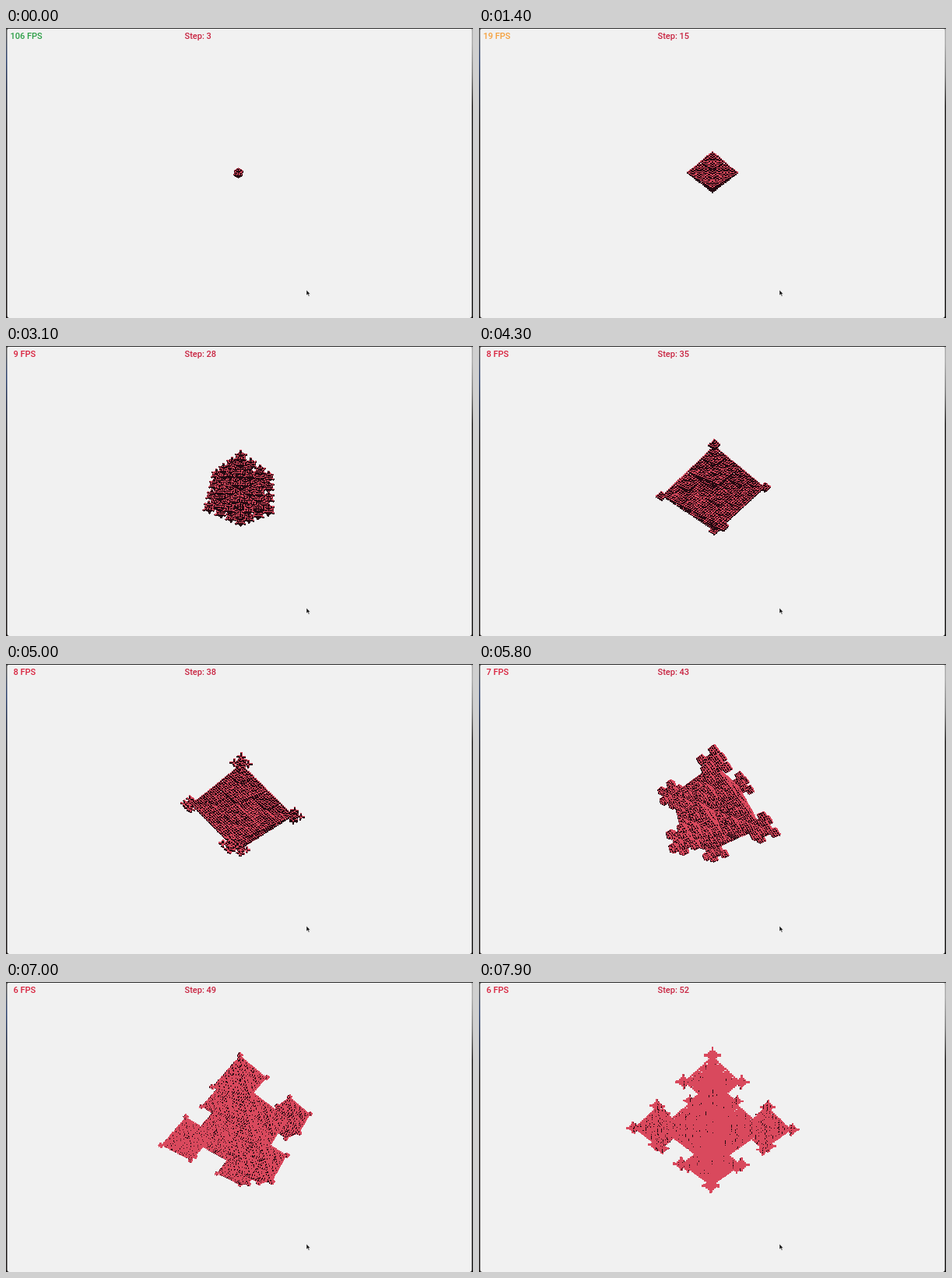
An HTML page with a canvas that plays this animation: 600x372 px, repeating every 8000 ms.

```html
<!DOCTYPE html>
<html lang="en">
<head>
<meta charset="utf-8">
<title>Growing crystal</title>
<style>
  html, body { margin: 0; width: 100%; height: 100%; overflow: hidden; background: #1c1917; }
  #stage { position: absolute; left: 0; top: 0; width: 600px; height: 372px; overflow: hidden;
    background: linear-gradient(#555 8px, #2f4470 40px, #1f2a45 75px, #1b1716 130px); }
  #edge { position: absolute; right: 0; top: 0; width: 3px; height: 372px;
    background: linear-gradient(#aaa 20px, #777 60px, #1d1b1a 100px, #151413); }
  canvas { position: absolute; left: 0; top: 0; clip-path: inset(1px 1.5px 0 1.5px round 2px 2px 3px 3px); }
  #top { position: absolute; width: 600px; height: 1px; background: #2d2d2d; }
  svg { position: absolute; left: 0; top: 0; }
  text { font: 500 11px Roboto, Arial, sans-serif; white-space: pre; }
</style>
</head>
<body>
<div id="stage">
  <div id="edge"></div>
  <canvas id="view" width="600" height="372"></canvas>
  <div id="top"></div>
  <svg width="600" height="372">
    <text id="fps" y="14"></text>
    <text id="step" x="229.5" y="14" fill="#c82340"></text>
    <path d="M386 336v7l1.6-1.4 1.2 2.7 1.2-.5-1.2-2.6h2.1z" fill="#111" stroke="#fff" stroke-width=".5"/>
  </svg>
</div>
<script>
const LOOP = 8000, TICK = 100;
const BG = [241, 241, 241], DARK = [36, 10, 17], LIT = [217, 73, 93];
const SHADES = [BG, DARK, LIT];
const CX = 300, CY = 187, FOCAL = 453, DIST = 215, PITCH = 0.63;
const PIVOT_X = -1; // the camera circles a point one cell beside the seed

// time, step, yaw in degrees, frames per second
const keys = [
  [0, 3, 130, 106], [1400, 15, 89.6, 19], [3100, 28, 41, 9], [4300, 35, 8, 8],
  [5800, 43, -32, 7], [7000, 49, -70.5, 6], [7900, 52, -91, 6]
];

// Crystal growth: a cell is born when exactly one face neighbour is alive.
const R = 56, S = 2 * R + 1, EMPTY = 255, LAST = 52;
const born = new Uint8Array(S * S * S).fill(EMPTY);
const around = [1, -1, S, -S, S * S, -S * S];
const seed = R * (1 + S + S * S);

function grow() {
  born[seed] = 0;
  let front = [seed];
  for (let k = 1; k <= LAST; k++) {
    const next = [];
    for (const cell of front) for (const d of around) {
      const c = cell + d;
      if (born[c] !== EMPTY) continue;
      let alive = 0;
      for (const e of around) if (born[c + e] < k) alive++;
      if (alive === 1) { born[c] = k; next.push(c); }
    }
    front = next;
  }
}

// Walks a ray through the cells: 0 = miss, 1 = dark face, 2 = lit face.
function trace(ox, oy, oz, dx, dy, dz, n) {
  // clip to the octahedron that holds every cell
  let t0 = 0, t1 = 1e9;
  const reach = n + 2;
  for (let i = 0; i < 4; i++) {
    const a = i & 1 ? -1 : 1, b = i & 2 ? -1 : 1;
    const o = ox + a * oy + b * oz, d = dx + a * dy + b * dz;
    const p = (-reach - o) / d, q = (reach - o) / d;
    t0 = Math.max(t0, Math.min(p, q));
    t1 = Math.min(t1, Math.max(p, q));
  }
  if (t0 >= t1) return 0;
  const x = ox + dx * t0, y = oy + dy * t0, z = oz + dz * t0;
  const ix = Math.round(x), iy = Math.round(y), iz = Math.round(z);
  const sx = dx > 0 ? 1 : -1, sy = dy > 0 ? 1 : -1, sz = dz > 0 ? 1 : -1;
  const stepX = Math.abs(1 / dx), stepY = Math.abs(1 / dy), stepZ = Math.abs(1 / dz);
  let tx = (ix + sx / 2 - x) / dx, ty = (iy + sy / 2 - y) / dy, tz = (iz + sz / 2 - z) / dz;
  let cell = seed + ix + iy * S + iz * S * S, t = 0, face = 1;
  const end = t1 - t0;
  while (t < end) {
    if (born[cell] <= n) return face;
    if (tx < ty && tx < tz) {
      t = tx; tx += stepX; cell += sx; face = sx < 0 ? 2 : 1;
    } else if (ty < tz) {
      t = ty; ty += stepY; cell += sy * S; face = 2;
    } else {
      t = tz; tz += stepZ; cell += sz * S * S; face = 1;
    }
  }
  return 0;
}

const ctx = document.getElementById("view").getContext("2d");
const fpsText = document.getElementById("fps"), stepText = document.getElementById("step");

// One ray per pixel keeps the cell edges hard.
function drawCrystal(n, yaw) {
  const c = Math.cos(yaw), s = Math.sin(yaw), sp = Math.sin(PITCH), cp = Math.cos(PITCH);
  const ox = PIVOT_X - DIST * cp * s, oy = DIST * sp, oz = DIST * cp * c;
  const half = Math.ceil(n * 2.3 + 8), left = CX - half, top = CY - half, size = 2 * half;
  const img = ctx.createImageData(size, size);
  for (let py = 0, at = 0; py < size; py++) for (let px = 0; px < size; px++, at += 4) {
    const u = (px + 0.5 - half) / FOCAL, v = (half - py - 0.5) / FOCAL;
    const dy = v * cp - sp, depth = -v * sp - cp;
    const hit = trace(ox, oy, oz, u * c - depth * s, dy, u * s + depth * c, n);
    img.data.set(SHADES[hit], at);
    img.data[at + 3] = 255;
  }
  ctx.fillStyle = `rgb(${BG})`;
  ctx.fillRect(0, 0, 600, 372);
  ctx.putImageData(img, left, top);
}

function draw(time) {
  let i = 0;
  while (i < keys.length - 2 && time >= keys[i + 1][0]) i++;
  const a = keys[i], b = keys[i + 1], p = (time - a[0]) / (b[0] - a[0]);
  const mix = j => a[j] + (b[j] - a[j]) * p;
  const n = Math.min(LAST, Math.floor(mix(1) + 1e-6));
  const fps = Math.round(a[3] * (b[3] / a[3]) ** p);
  drawCrystal(n, mix(2) * Math.PI / 180);
  fpsText.textContent = fps + " FPS";
  fpsText.setAttribute("x", fps < 10 ? 9.5 : 5.5);
  fpsText.setAttribute("fill", fps < 15 ? "#d8203c" : fps < 30 ? "#f5a03c" : "#2a9e45");
  stepText.textContent = "Step: " + n;
}

grow();
const start = performance.now();
let shown = -1;
function frame() {
  const tick = Math.floor((performance.now() - start) % LOOP / TICK);
  if (tick !== shown) draw((shown = tick) * TICK);
  requestAnimationFrame(frame);
}
frame();
</script>
</body>
</html>
```
